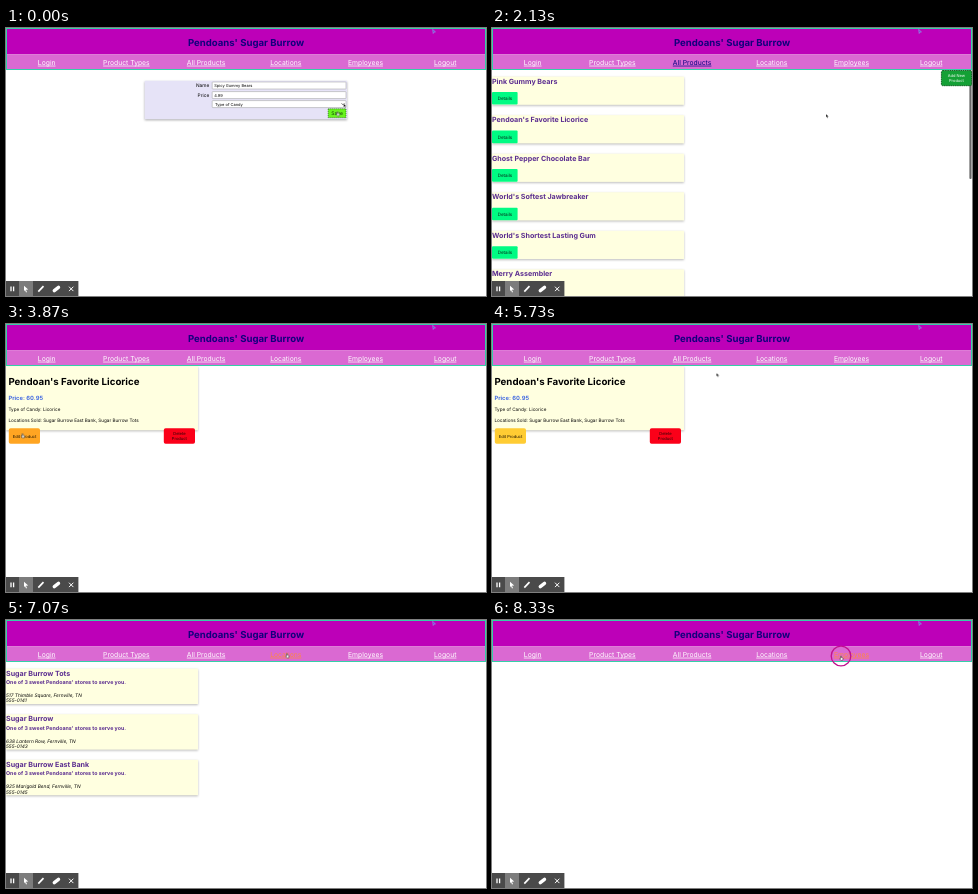
Recreate the animation shown at these times as an HTML page. Size 480x268 px, loop 8390 ms.

```html
<!DOCTYPE html>
<html lang="en">
<head>
<meta charset="utf-8">
<title>Candy shop</title>
<style>
html, body { margin: 0; width: 100%; height: 100%; overflow: hidden; background: #fff; }
svg { display: block; width: 100%; height: 100%; }
text { font-family: Inter, Roboto, sans-serif; text-rendering: geometricPrecision; white-space: pre; }
.b { font-weight: 700; }
.i { font-style: italic; }
.mid { text-anchor: middle; }
.end { text-anchor: end; }
.purple { fill: #5b2d90; }
.nav { font-size: 6.8px; fill: #fff; text-decoration: underline; text-anchor: middle; }
.card { fill: #ffffe0; filter: drop-shadow(0 1px 1.2px #0004); }
.field { fill: #fff; stroke: #999; stroke-width: .5; }

/* every animation shares one 8390 ms loop */
.t { animation: 8390ms step-end infinite; }
#form { animation-name: form; }
#shop { animation-name: shop; }
#list { animation-name: list; }
#item { animation-name: item; }
#stores { animation-name: stores; }
#trail { animation-name: trail; }
#edit { animation-name: edit; }
#ring { animation-name: ring; }
#hand { animation-name: hand; }
#arrow { animation-name: arrow; }
#nav2 { animation-name: visited; }
#nav3 { animation-name: hoverA; }
#nav4 { animation-name: hoverB; }
#cursor { animation: move 8390ms linear infinite; }

@keyframes form { 0% { visibility: visible } 12.753%, to { visibility: hidden } }
@keyframes shop { 0% { visibility: hidden } 12.753% { visibility: visible } 41.359%, to { visibility: hidden } }
@keyframes list { 0% { visibility: hidden } 15.852% { visibility: visible } 41.359%, to { visibility: hidden } }
@keyframes item { 0% { visibility: hidden } 41.359% { visibility: visible } 77.831%, to { visibility: hidden } }
@keyframes stores { 0% { visibility: hidden } 77.831% { visibility: visible } 99.28%, to { visibility: hidden } }
@keyframes trail { 0% { visibility: visible } 2.38%, to { visibility: hidden } }
@keyframes edit { 0% { fill: #ffa522 } 60%, to { fill: #ffcc33 } }
@keyframes visited { 0% { fill: #fff } 12.753% { fill: #000080 } 41.359%, to { fill: #fff } }
@keyframes hoverA { 0% { fill: #fff } 71.5% { fill: #ff8a3c } 92.9%, to { fill: #fff } }
@keyframes hoverB { 0% { fill: #fff } 94.3%, to { fill: #ff8a3c } }
@keyframes ring {
  0%, 7.98%, 39.69%, 78.665% { visibility: hidden }
  4.768%, 37.306%, 75.447%, 99.28%, to { visibility: visible }
}
@keyframes hand {
  0%, 34.9%, 71.5%, to { visibility: visible }
  25.3%, 60% { visibility: hidden }
}
@keyframes arrow {
  0%, 34.9%, 71.5%, to { visibility: hidden }
  25.3%, 60% { visibility: visible }
}
@keyframes move {
  0%, 12.74% { transform: translate(331.5px, 83.5px) }
  12.753%, 25.387% { transform: translate(334px, 86px); animation-timing-function: ease-in-out }
  34.923%, 58.76% { transform: translate(16.5px, 109.5px); animation-timing-function: ease-in-out }
  68.296%, 69.13% { transform: translate(224.4px, 49px); animation-timing-function: ease-out }
  72.348%, 91.418% { transform: translate(281px, 33.5px); animation-timing-function: ease-in-out }
  95.352%, to { transform: translate(349px, 36px) }
}
</style>
</head>
<body>
<svg id="stage" viewBox="0 0 480 268"></svg>
<script>
const text = (x, y, size, str, cls = "", fill = "") =>
  `<text x="${x}" y="${y}" font-size="${size}" class="${cls}"${fill && ` fill="${fill}"`}>${str}</text>`;
const rect = (x, y, w, h, attrs) =>
  `<rect x="${x}" y="${y}" width="${w}" height="${h}" ${attrs}/>`;
const group = (id, body) => `<g id="${id}" class="t">${body}</g>`;

const town = "Sugar Burrow";

function header() {
  const links = ["Login", "Product Types", "All Products", "Locations", "Employees", "Logout"];
  return rect(0, 0, 480, 26.2, 'fill="#bd00b8"')
    + rect(0, 26.2, 480, 15.3, 'fill="#da69d2"')
    + rect(.5, .5, 479, 41, 'fill="none" stroke="#35cfa8"')
    + text(240, 17.6, 9.6, `Pendoans' ${town}`, "b mid", "#12007c")
    + links.map((s, i) =>
        `<text id="nav${i}" class="nav t" x="${40.7 + i * 79.7}" y="36.7">${s}</text>`).join("")
    + '<path d="M426.6 1.4l2.9 2.5-1.5.2-.8 1.4z" fill="#7a3fd0" stroke="#8fb4f0" stroke-width=".5"/>';
}

function form() {
  const fields = [54, 63.6, 72.6].map(y => rect(206.2, y, 133.8, 7, 'rx=".6" class="field"')).join("");
  return rect(138.7, 52.8, 202.3, 38.4, 'fill="#e6e3f7" style="filter:drop-shadow(0 1px 1.2px #0005)"')
    + fields
    + text(203.2, 59.4, 4.8, "Name", "end")
    + text(203.2, 69, 4.8, "Price", "end")
    + text(208.2, 59, 4, "Spicy Gummy Bears")
    + text(208.2, 68.6, 4, "4.99")
    + text(209, 77.6, 4, "Type of Candy")
    + '<path d="M335.6 75.4l1.4 1.4 1.4-1.4" fill="none" stroke="#222" stroke-width=".7"/>'
    + rect(322.2, 80.8, 17.8, 8.9, 'fill="#68f51e" stroke="#164d08" stroke-width=".6" stroke-dasharray="1.2 .8"')
    + text(331.1, 86.8, 5, "Save", "mid", "#0c3506");
}

function shop() {
  return rect(449.4, 42.5, 30.2, 15.2, 'rx="1.5" fill="#14a035" stroke="#0a5a1c" stroke-width=".9" stroke-dasharray="1.6 .6"')
    + text(464.4, 48.8, 4, "Add New", "mid", "#fff")
    + text(464.4, 53.6, 4, "Product", "mid", "#fff");
}

function list() {
  const sweets = ["Pink Gummy Bears", "Pendoan's Favorite Licorice", "Ghost Pepper Chocolate Bar",
    "World's Softest Jawbreaker", "World's Shortest Lasting Gum", "Merry Assembler"];
  return sweets.map((s, i) => {
    const y = 48.6 + i * 38.55;
    return rect(0, y, 192, 28.2, 'class="card"')
      + text(0, y + 7.1, 7.12, s, "b purple")
      + rect(0, y + 15.4, 25.6, 12.6, 'rx="1" fill="#00fb83"')
      + text(12.9, y + 23.4, 4.5, "Details", "mid", "#06281a");
  }).join("") + rect(477.4, 42, 2.2, 109, 'rx="1" fill="#666"');
}

function item() {
  return rect(0, 42.2, 192, 64, 'class="card"')
    + text(2.4, 61.3, 9.7, "Pendoan's Favorite Licorice", "b")
    + text(2.4, 76.1, 5.8, "Price: 60.95", "b", "#4169e1")
    + text(2.4, 87.1, 4.62, "Type of Candy: Licorice")
    + text(2.4, 97.6, 4.62, `Locations Sold: ${town} East Bank, ${town} Tots`)
    + rect(2.8, 104.2, 31.2, 15.5, 'id="edit" class="t" rx="1.8"')
    + text(18.5, 113.5, 4.1, "Edit Product", "mid", "#1c1200")
    + rect(157.8, 104.2, 31.2, 15.5, 'rx="1.8" fill="#fb0019"')
    + text(173.4, 111, 4.1, "Delete", "mid", "#2c0005")
    + text(173.4, 115.8, 4.1, "Product", "mid", "#2c0005");
}

function stores() {
  const shops = [
    [" Tots", "517 Thimble Square", "555-0141"],
    ["", "638 Lantern Row", "555-0143"],
    [" East Bank", "925 Marigold Bend", "555-0145"]
  ];
  return shops.map(([name, street, phone], i) => {
    const y = 48.6 + i * 45.6;
    return rect(0, y, 192, 35.4, 'class="card"')
      + text(0, y + 7.1, 7.12, town + name, "b purple")
      + text(0, y + 15.5, 5.3, "One of 3 sweet Pendoans' stores to serve you.", "b purple")
      + text(0, y + 28.5, 4.8, `${street}, Fernville, TN`, "i")
      + text(0, y + 33.8, 4.8, phone, "i");
  }).join("");
}

function toolbar() {
  return rect(0, 253, 72.4, 15, 'fill="#4a4a4a"')
    + rect(13, 253, 14, 15, 'fill="#7c7c7c"')
    + `<g fill="#fff" stroke="#fff">
        <path d="M5 258.6v4.6M7.6 258.6v4.6" stroke-width="1.3"/>
        <path d="M18 257.8l4.2 3.7-2.3.2 1.1 2.4-1 .4-1-2.4-1 1.2z" stroke="none"/>
        <path d="M32.3 263.6l5.2-5.4" stroke-width="1.7"/>
        <path d="M48.3 262.6l4.2-3.2" stroke-width="3.4" stroke-linecap="round"/>
        <path d="M63 258.7l4.4 4.4M67.4 258.7l-4.4 4.4" stroke-width="1"/>
      </g>`;
}

const pointer = '<path d="M0 0v3.6l.9-.8.7 1.4.6-.3-.7-1.3h1.2z" fill="#111" stroke="#fff" stroke-width=".3"/>';

function cursor() {
  return `<g id="cursor">
    <circle id="ring" class="t" r="9.8" fill="none" stroke="#c2108f" stroke-width="1.3"/>
    <g id="arrow" class="t">${pointer}</g>
    <path id="hand" class="t" d="M-.5 2.4V.3q.5-.6 1 0v1.4l1.2.3q.5.3.3 1L1.6 4.4H-.2L-1.2 2.8q.1-.7.7-.4z"
      fill="#fff" stroke="#222" stroke-width=".5"/>
  </g>`;
}

document.getElementById("stage").innerHTML =
  group("form", form()) + group("list", list()) + group("item", item())
  + group("stores", stores()) + header() + group("shop", shop()) + toolbar()
  + group("trail", `<g transform="translate(337.6 75.6)">${pointer}</g>`) + cursor();
</script>
</body>
</html>
```
